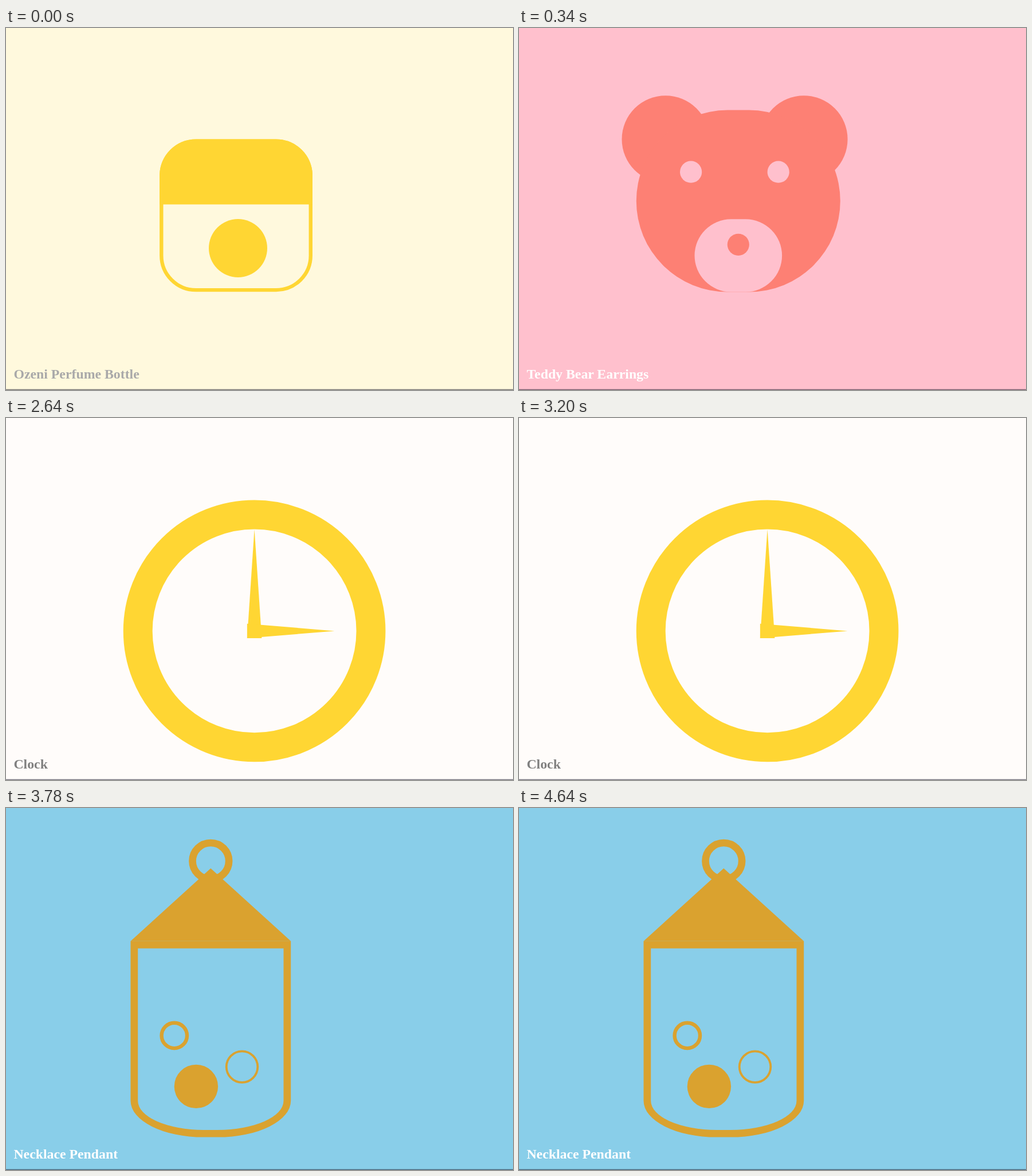
Animation, 885 px wide and 633 px high, one loop 4660 ms. Source, as an HTML page:

```html
<!DOCTYPE html>
<html lang="en">
<head>
<meta charset="utf-8">
<title>Shape slideshow</title>
<style>
  html, body { margin: 0; width: 100%; height: 100%; overflow: hidden; }
  svg { display: block; width: 885px; height: 633px; }
  g { display: none; }
  g.on { display: inline; }
  text { font: bold 23.8px "Liberation Serif", Times, serif; }
  .line { fill: none; stroke: currentColor; }
  .bg { fill: var(--bg); }
  #perfume { --bg: #fff9dd; color: #ffd633; }
  #bear { --bg: #ffc0cd; color: #fd8074; }
  #cologne { --bg: #a9a9a9; color: #f0e7ae; }
  #clock { --bg: #fffcfa; color: #ffd633; }
  #pendant { --bg: #89cee9; color: #daa22f; }
</style>
</head>
<body>
<svg viewBox="0 0 885 633" fill="currentColor">
  <g id="perfume">
    <rect class="bg" width="885" height="633"/>
    <rect class="line" x="271.3" y="197.7" width="260.5" height="260.4" rx="60.4" stroke-width="6.4"/>
    <path d="M268.1 308.6V258A63.5 63.5 0 0 1 331.6 194.5H471.5A63.5 63.5 0 0 1 535 258V308.6z"/>
    <circle cx="405" cy="385" r="51"/>
    <text x="13.4" y="613" fill="#a9a9a9">Ozeni Perfume Bottle</text>
  </g>

  <g id="bear">
    <rect class="bg" width="885" height="633"/>
    <circle cx="255.8" cy="194.5" r="76.3"/>
    <circle cx="497.3" cy="194.5" r="76.3"/>
    <rect x="204.8" y="143.6" width="356" height="317.9" rx="159"/>
    <circle class="bg" cx="300.1" cy="251.7" r="19.1"/>
    <circle class="bg" cx="452.7" cy="251.7" r="19.1"/>
    <rect class="bg" x="306.5" y="334.3" width="152.6" height="127.2" rx="63.6"/>
    <circle cx="382.8" cy="378.8" r="19.1"/>
    <text x="13.4" y="613" fill="#fff">Teddy Bear Earrings</text>
  </g>

  <g id="cologne">
    <rect class="bg" width="885" height="633"/>
    <rect x="287.4" y="92.8" width="165.3" height="89" rx="6.4"/>
    <rect class="bg" x="293.8" y="99.1" width="152.6" height="76.3"/>
    <path d="M312.9 181h6.3v53h-6.3zM420.9 181h6.4v53h-6.4z"/>
    <rect x="242.9" y="232.7" width="254.3" height="330.5" rx="6.4"/>
    <rect class="bg" x="287.4" y="283.5" width="165.3" height="165.3" rx="6.4"/>
    <text x="13.4" y="613" fill="#fff">Cologne Bottle</text>
  </g>

  <g id="clock">
    <rect class="bg" width="885" height="633"/>
    <circle class="line" cx="433.6" cy="372.4" r="203.4" stroke-width="50.9"/>
    <path d="M433.6 194.5L446.4 385.1H420.9z"/>
    <path d="M573.5 372.4L420.9 385.1V359.7z"/>
    <text x="13.4" y="613" fill="#808080">Clock</text>
  </g>

  <g id="pendant">
    <rect class="bg" width="885" height="633"/>
    <circle class="line" cx="357.3" cy="92.8" r="31.8" stroke-width="12.7"/>
    <path d="M357.3 105.5L497.2 232.7H217.5z"/>
    <path d="M217.5 232.7H497.2V512A127.2 63.6 0 0 1 370 575.6H344.7A127.2 63.6 0 0 1 217.5 512z"/>
    <path class="bg" d="M230.2 245.4H484.5V512A114.5 50.9 0 0 1 370 562.9H344.7A114.5 50.9 0 0 1 230.2 512z"/>
    <circle class="line" cx="293.8" cy="397.9" r="22.2" stroke-width="6.4"/>
    <circle class="line" cx="412" cy="452.6" r="27.3" stroke-width="3.8"/>
    <circle cx="331.9" cy="486.9" r="38.2"/>
    <text x="13.4" y="613" fill="#fff">Necklace Pendant</text>
  </g>

  <rect y="631.6" width="885" height="1.4" fill="#223" fill-opacity=".6"/>
</svg>
<script>
  const LOOP = 4660;
  const starts = [0, 340, 1500, 2640, 3780];
  const scenes = document.querySelectorAll('g');
  const origin = performance.now();

  function draw() {
    const t = (performance.now() - origin) % LOOP;
    const current = starts.filter(start => start <= t).length - 1;
    scenes.forEach((scene, i) => scene.classList.toggle('on', i === current));
    requestAnimationFrame(draw);
  }
  draw();
</script>
</body>
</html>
```
